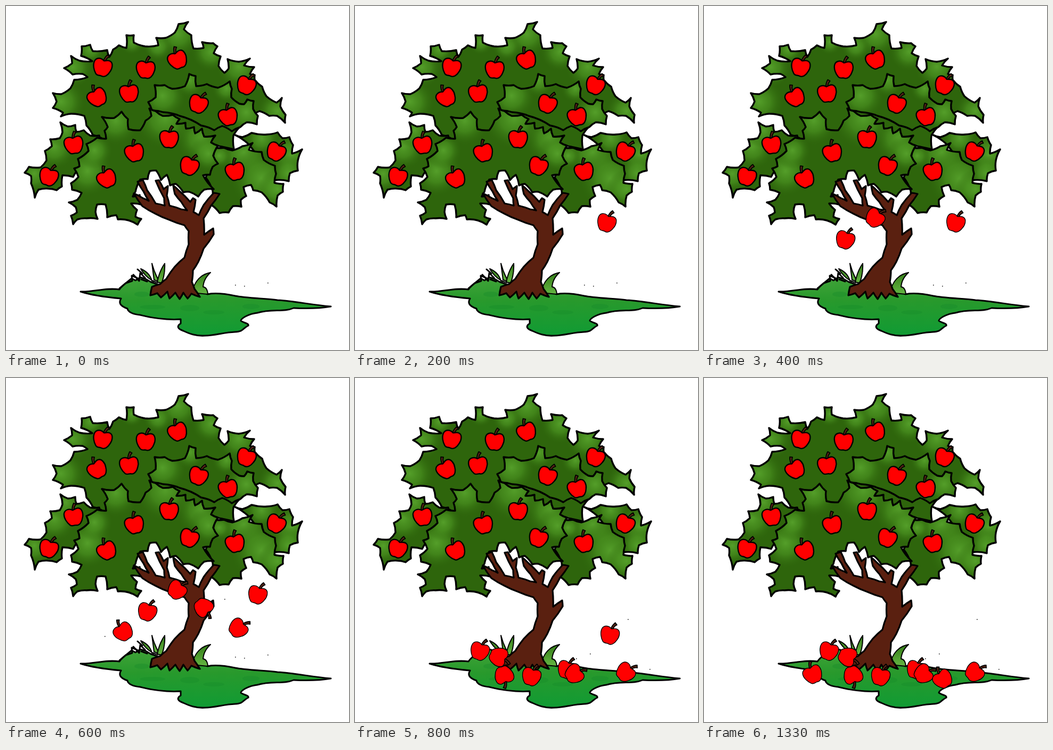
Write an HTML page that moves like this. It is 644 by 648 pixels and loops after 1.55 s.

```html
<!DOCTYPE html>
<html lang="en">
<head>
<meta charset="utf-8">
<title>Apple tree</title>
<style>
html, body { margin: 0; width: 100%; height: 100%; overflow: hidden; background: #fff; }
svg { display: block; width: 100vw; height: 100vh; }
</style>
</head>
<body>
<svg id="stage" viewBox="0 0 644 648" stroke-linejoin="round" stroke-linecap="round">
  <defs>
    <radialGradient id="glow">
      <stop offset="0" stop-color="#56a12b" stop-opacity=".95"/>
      <stop offset=".45" stop-color="#4b9421" stop-opacity=".65"/>
      <stop offset="1" stop-color="#2e650c" stop-opacity="0"/>
    </radialGradient>
    <linearGradient id="lawn" x1="0" y1="0" x2="0" y2="1">
      <stop offset="0" stop-color="#40a338"/>
      <stop offset=".4" stop-color="#28992c"/>
      <stop offset="1" stop-color="#109b34"/>
    </linearGradient>
    <linearGradient id="blade" x1="0" y1="0" x2="0" y2="1">
      <stop offset="0" stop-color="#347c17"/>
      <stop offset="1" stop-color="#65b643"/>
    </linearGradient>
  </defs>
  <g id="ground"></g>
  <g id="leaves"></g>
  <g id="trunk"></g>
  <g id="apples"></g>
</svg>
<script>
const LOOP = 1550;
const NS = "http://www.w3.org/2000/svg";
const byId = id => document.getElementById(id);
const timed = [];

function add(parent, tag, attrs) {
  const el = document.createElementNS(NS, tag);
  for (const key in attrs) el.setAttribute(key, attrs[key]);
  return parent.appendChild(el);
}

// Joins points with edges that bow sideways by a share of their length.
function outline(text, bow = 0) {
  const pts = text.trim().split(/\s+/).map(p => p.split(",").map(Number));
  let d = "M" + pts[0];
  pts.forEach(([x, y], i) => {
    const [u, v] = pts[(i + 1) % pts.length];
    const cx = (x + u) / 2 - (v - y) * bow;
    const cy = (y + v) / 2 + (u - x) * bow;
    d += `Q${cx.toFixed(1)},${cy.toFixed(1)} ${u},${v}`;
  });
  return d + "Z";
}

function during(el, from, to = LOOP) {
  timed.push({ el, from, to });
  return el;
}

// Lawn and grass
const ground = byId("ground");
add(ground, "path", {
  d: `M140,538 C165,539 188,530 213,534 C218,526 228,520 236,513 L243,517 252,511 262,514 272,520
    L290,526 362,534 378,543 C393,540 411,542 430,546 S485,551 510,554
    C544,556 572,563 610,566 C588,570 562,570 540,569 C522,577 498,570 472,578
    C454,580 441,589 441,593 C448,598 456,597 455,602 C444,607 447,613 430,614
    C408,615 396,620 373,621 C356,622 344,617 333,612 C322,608 320,603 328,598
    L328,590 C302,592 270,587 252,582 C240,581 229,577 228,570
    C214,565 211,559 216,551 C193,549 164,546 140,538Z`,
  fill: "url(#lawn)", stroke: "#000", "stroke-width": 3
});
[[255, 543, 14, 5], [275, 567, 24, 4], [345, 569, 18, 6], [390, 577, 20, 4], [460, 566, 16, 5]]
  .forEach(([cx, cy, rx, ry]) => add(ground, "ellipse",
    { cx, cy, rx, ry, fill: "#16892a", "fill-opacity": .35 }));
["M253,495 Q270,502 274,518 L285,521 Q265,516 253,495Z",
 "M274,485 Q276,501 278,516 L288,519 Q279,504 274,485Z",
 "M298,485 Q299,506 292,522 L284,520 Q288,499 298,485Z",
 "M350,536 Q358,507 384,502 Q371,514 370,529 Q378,530 379,543 L359,541Z"]
  .forEach(d => add(ground, "path", { d, fill: "url(#blade)", stroke: "#000", "stroke-width": 2 }));
during(add(ground, "path", {
  d: "M213,532 L225,522 237,518 236,508 246,512 M239,506 L250,518 252,503 261,512 M247,496 L256,504 M254,515 L265,519",
  fill: "none", stroke: "#000", "stroke-width": 3
}), 0, 800);

// Foliage: outline, then soft light spots as x, y, radius
const clusters = [
  [`88,164 104,166 121,155 128,139 153,134 144,128 125,129 109,117 124,108 122,94 138,103
    162,104 141,94 142,76 158,73 163,85 190,83 194,96 201,82 212,74 226,79 226,55 240,55
    240,69 261,76 286,74 282,60 300,60 317,50 324,34 342,30 334,44 348,55 352,80 371,79
    368,68 389,70 397,76 390,89 403,95 399,113 410,126 418,118 416,100 437,105 458,99
    447,112 466,115 458,128 467,130 467,139 481,152 489,170 508,182 518,173 515,189 525,205
    524,220 509,207 494,207 476,198 464,205 440,227 427,244 428,270 300,260 190,255
    163,243 151,225 147,207 122,203 103,208 107,201 88,192 95,180`,
   [[103, 180, 48], [125, 115, 40], [158, 82, 28], [322, 52, 46], [385, 86, 38], [437, 114, 43],
    [510, 198, 40], [285, 76, 28], [236, 68, 24]]],
  [`428,242 444,247 461,239 490,242 510,238 519,249 532,247 539,262 537,278 556,270
    548,291 548,310 533,315 531,330 506,328 480,300 455,260`,
   [[535, 280, 45], [480, 249, 34], [530, 315, 34]]],
  [`35,314 43,303 65,304 76,291 73,273 86,264 83,251 101,249 106,238 102,219 116,227
    130,224 132,237 146,234 158,244 175,244 182,270 139,304 126,322 106,319 105,340
    95,347 79,344 61,346 54,361 47,334 47,320`,
   [[90, 265, 44], [53, 316, 38], [112, 234, 34]]],
  [`267,181 281,172 279,149 298,149 312,156 336,151 344,128 356,132 357,151 377,147
    398,154 420,142 424,156 423,172 438,184 447,185 453,176 465,179 464,194 473,207
    471,223 452,219 440,228 424,236 406,226 391,234 366,225 326,207 295,200 274,197`,
   [[294, 169, 46], [451, 200, 43], [345, 140, 32], [414, 155, 28]]],
  [`392,267 409,267 425,272 444,264 463,258 456,271 480,275 484,290 505,301 507,316
    504,333 521,335 520,350 510,357 508,378 495,370 480,351 464,347 460,337 446,341
    451,358 441,365 442,378 426,377 418,389 401,390 386,375 388,348 375,323`,
   [[447, 276, 53], [480, 325, 60], [510, 345, 38], [400, 282, 24]]],
  [`128,306 138,302 135,288 155,273 151,260 171,248 188,250 185,235 191,228 180,209
    203,211 217,199 229,213 230,232 252,234 262,216 273,207 269,193 281,198 294,207
    313,205 326,213 320,222 337,220 338,231 353,228 355,240 368,231 372,246 393,244
    385,257 398,263 389,282 398,297 388,303 383,318 370,319 390,345 372,346 361,359
    344,350 333,351 319,335 308,338 302,318 291,328 282,310 270,311 266,326 252,327
    243,350 238,359 251,356 254,374 235,372 246,384 243,397 254,401 247,412 231,404
    210,402 207,394 190,398 187,374 171,374 168,388 172,401`
    + ` 151,400 134,402`,
   [[206, 216, 47], [299, 211, 60], [367, 249, 50], [153, 311, 48], [380, 278, 36], [166, 272, 35]]]
];
// The lower left tuft belongs to the front cluster and closes its outline.
clusters[5][0] += " 126,411 122,395 133,389 131,379 118,370 134,365 142,352 124,346 122,334 136,322";

const leaves = byId("leaves");
const defs = document.querySelector("defs");
clusters.forEach(([points, lights], i) => {
  const d = outline(points, .09);
  add(add(defs, "clipPath", { id: "clip" + i }), "path", { d });
  add(leaves, "path", { d, fill: "#2e650c" });
  const shine = add(leaves, "g", { "clip-path": `url(#clip${i})` });
  lights.forEach(([cx, cy, r]) => add(shine, "circle", { cx, cy, r, fill: "url(#glow)" }));
  add(leaves, "path", { d, fill: "none", stroke: "#000", "stroke-width": 3.4 });
});

// Trunk with five branches
add(byId("trunk"), "path", {
  d: outline(`240,353 257,362 268,367 258,349 247,331 257,328 265,347 281,372 298,376
    297,362 281,329 287,328 296,345 304,339 302,357 307,376 329,383 340,385 329,369
    317,354 314,338 325,348 346,369 351,362 356,365 352,388 362,394 371,375 390,352
    401,354 385,376 371,400 372,431 389,419 390,430 371,457 361,482 351,498 349,520
    354,533 364,548 348,542 341,551 333,540 326,552 318,540 307,551 303,538 291,549
    284,541 271,545 274,529 289,524 301,514 317,491 335,474 343,449 343,424 335,413
    307,403 280,391 256,377`, -.04),
  fill: "#5a2010", stroke: "#000", "stroke-width": 3.2
});

// Apples
const apples = byId("apples");
function apple(x, y, turn, weight = 2.4) {
  const g = add(apples, "g", { transform: `translate(${x} ${y}) rotate(${turn})` });
  add(g, "path", {
    d: "M-1,-12 Q0,-20 4,-25 L8,-22 Q3,-18 3,-12Z",
    fill: "#572515", stroke: "#000", "stroke-width": 1.8
  });
  add(g, "path", {
    d: "M0,-12 C-6,-17 -15,-15 -17,-8 C-19,0 -14,10 -9,15 C-5,19 0,15 3,17 C9,18 14,12 16,5 C19,-2 18,-12 12,-14 C8,-16 4,-13 0,-12Z",
    fill: "#f00", stroke: "#000", "stroke-width": weight
  });
  return g;
}

[[181, 115, 14], [262, 119, 3], [322, 101, -24], [171, 172, -32], [231, 164, -6], [361, 184, 22],
 [417, 208, -15], [451, 149, 22], [127, 261, -9], [80, 321, 18], [189, 325, -28], [241, 276, -15],
 [306, 250, 2], [344, 301, 22], [430, 311, -14], [507, 274, 28]]
  .forEach(a => apple(...a));

// x, y, turn, from, to
[[472, 408, 18, 200, 800], [321, 399, 42, 400, 800], [265, 440, 18, 400, 800],
 [220, 478, -38, 600, 800], [371, 432, 136, 600, 800], [436, 471, 52, 600, 800],
 [234, 514, 20, 800], [270, 525, 112, 800], [280, 560, 164, 800], [331, 562, 16, 800],
 [398, 549, 18, 800], [412, 557, 60, 800], [508, 554, 50, 800], [478, 484, 16, 800, 1000],
 [204, 558, -24, 1000], [448, 567, -36, 1000]]
  .forEach(([x, y, turn, from, to]) => during(apple(x, y, turn, 1.4), from, to));

// Loose specks
[[491, 521, 0, 800], [447, 527, 0, 800], [430, 525, 0, 800], [185, 486, 600, 800], [410, 416, 600, 800],
 [512, 454, 800], [441, 519, 800], [415, 528, 800], [553, 548, 800]]
  .forEach(([x, y, from, to]) => during(
    add(apples, "rect", { x, y, width: 1.5, height: 1.5 }), from, to));

const start = performance.now();
function draw(now) {
  const t = Math.max(0, now - start) % LOOP;
  for (const { el, from, to } of timed) {
    el.style.display = t >= from && t < to ? "" : "none";
  }
  requestAnimationFrame(draw);
}
draw(start);
</script>
</body>
</html>
```
